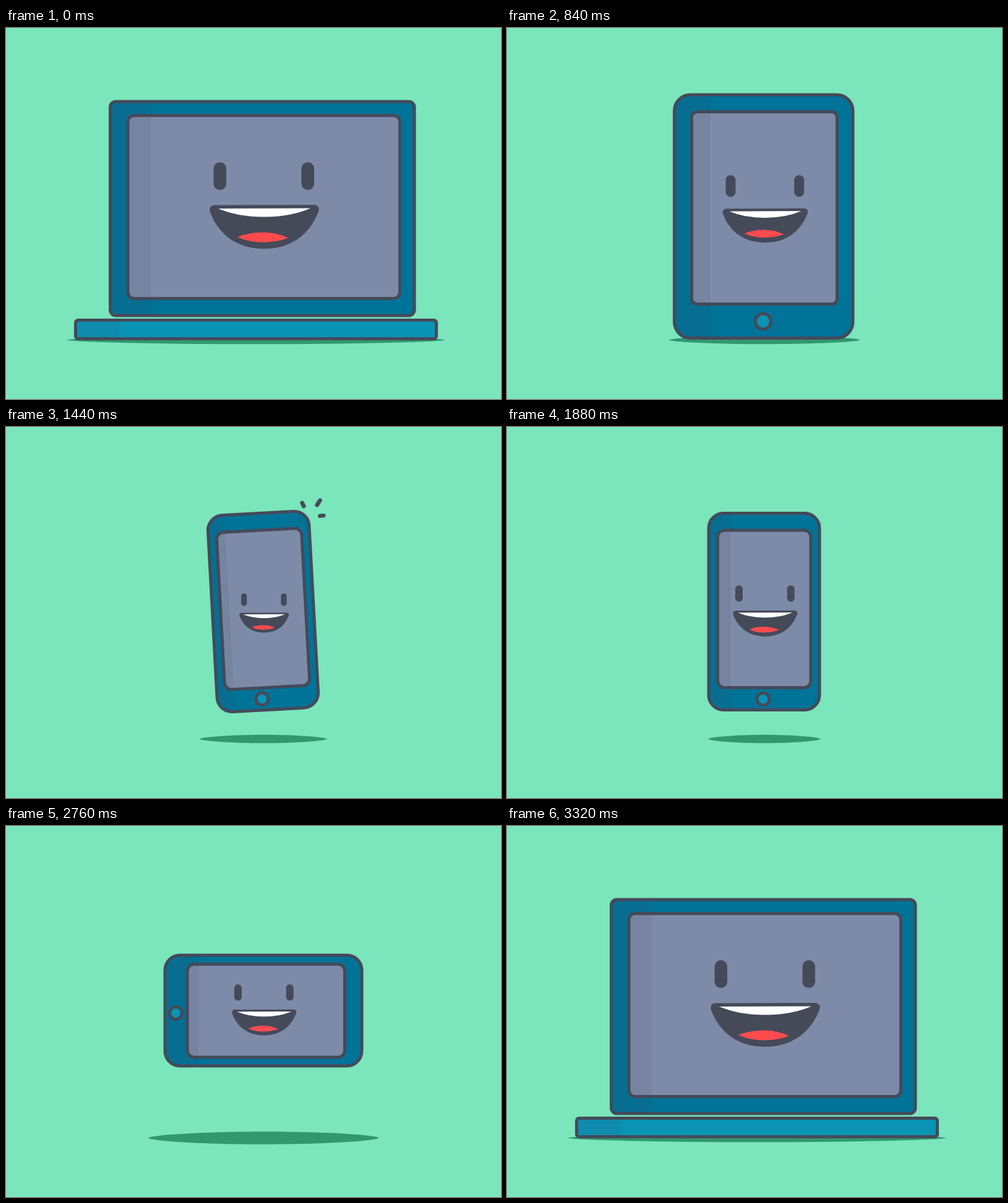
Write an HTML page that moves like this. It is 800 px wide and 600 px high and loops after 3.36 s.

```html
<!DOCTYPE html>
<html lang="en">
<head>
<meta charset="utf-8">
<title>Shape-shifting device</title>
<style>
  html, body { margin: 0; width: 100%; height: 100%; overflow: hidden; background: #7be5bc; }
  svg { display: block; width: 100vw; height: 100vh; }
  .line { stroke: #454a59; stroke-width: 5; stroke-linejoin: round; }
  .ink { fill: #454a59; }
  .tint { fill: #454a59; opacity: .1; }
</style>
</head>
<body>
<svg viewBox="0 0 800 600">
  <defs>
    <clipPath id="lidClip"><path id="lidMask"/></clipPath>
    <clipPath id="keyClip"><path id="keyMask"/></clipPath>
  </defs>
  <path id="shadow" fill="#32976f"/>
  <g id="body">
    <g id="device">
      <g id="shell">
        <path id="lid" class="line" fill="#007398"/>
        <path id="screen" class="line" fill="#7d8ba9"/>
      </g>
      <g clip-path="url(#lidClip)"><rect id="shine" class="tint" x="-100" y="-100" height="800"/></g>
    </g>
    <g id="face">
      <rect class="ink" x="335.5" y="217" width="20.5" height="45" rx="10.25"/>
      <rect class="ink" x="477.5" y="217" width="20.5" height="45" rx="10.25"/>
      <path class="ink" d="M336 286.5L499 286Q508 288 505 297C490 335 460 357 417 357C374 357 344 335 330 298Q327 288 336 286.5Z"/>
      <path fill="#fff" d="M343 292L492 291.5Q460 305.5 417 305.5Q375 305.5 343 292Z"/>
      <path fill="#ff4b4e" d="M374 338Q392 330.5 415 330.5Q437 330.5 456 339.5Q437 346.5 415 346.5Q392 346.5 374 338Z"/>
    </g>
  </g>
  <g id="keyGroup">
    <path id="key" class="line" fill="#0994b6"/>
    <g clip-path="url(#keyClip)"><rect id="keyShine" class="tint" y="-100" height="800"/></g>
  </g>
  <path id="marks" fill="none" stroke="#454a59" stroke-linecap="round"/>
</svg>
<script>
const LOOP = 3360, STEP = 40;
const { PI, sin, cos, sqrt, min, max } = Math;
const el = Object.fromEntries([...document.querySelectorAll('[id]')].map(node => [node.id, node]));
const set = (id, attrs) => { for (const name in attrs) el[id].setAttribute(name, attrs[name]); };

// Boxes: centre x, centre y, width, height, corner radius. Shadow: centre x, half width, half height
const laptop = {
  lid: [414.25, 292, 491.5, 346, 9],
  screen: [416.75, 289.5, 439.5, 296, 10],
  key: [404, 487.5, 583, 30, 4],
  face: [1], shine: [234], shadow: [404, 305, 6.8]
};
const tablet = {
  lid: [414.75, 304.75, 288.5, 393.5, 26],
  screen: [416, 291, 235, 311, 9],
  key: [414, 474.5, 25, 25, 12.5],
  face: [.78], shine: [328], shadow: [416, 154, 6.8]
};
const phone = {
  lid: [415.5, 298.5, 179, 318, 24],
  screen: [415.75, 294.25, 150.5, 254.5, 11],
  key: [414, 440, 20, 20, 10],
  face: [.59], shine: [361.5], shadow: [416, 90.5, 6.8]
};

// The landscape pose is the phone after a quarter turn
const shellPivot = [415.75, 298.75], keyPivot = [413, 301.5];
const quarterTurn = ([x, y, w, h, r], [px, py]) => [px + py - y, py + x - px, h, w, r];
const wide = {
  lid: quarterTurn(phone.lid, shellPivot),
  screen: quarterTurn(phone.screen, shellPivot),
  key: quarterTurn(phone.key, keyPivot),
  face: phone.face, shine: [311], shadow: [416, 186, 10.3]
};

const stages = [
  { from: laptop, to: tablet, start: 240, peak: 400, end: 600, kick: .05, sway: 1 },
  { from: tablet, to: phone, start: 1160, peak: 280, end: 720, kick: 0 },
  { from: phone, to: wide, start: 2000, peak: 200, end: 640, kick: .1, spin: true },
  { from: wide, to: laptop, start: 2880, peak: 200, end: 440, kick: .2 }
];

// Rises past 1 by `kick`, then swings back to rest at `end`
function spring(u, peak, end, kick) {
  if (u <= 0) return 0;
  if (u < peak) {
    const k = u / peak;
    return (1 + kick) * k * k * (3 - 2 * k);
  }
  const v = min(1, (u - peak) / (end - peak));
  return 1 + kick * cos(1.5 * PI * v) * (1 - v) ** 2;
}

// Rounded box; a bulge bows the edges outwards and pulls the corners in
function box([cx, cy, w, height, radius], bulge) {
  const h = height - 2 * bulge;
  const r = max(2, min(radius - 2 * bulge, w / 2, h / 2));
  const l = cx - w / 2, R = cx + w / 2, t = cy - h / 2, b = cy + h / 2;
  const by = 2 * bulge, bx = by * min(1, h / w);
  const corner = (x, y) => `A${r} ${r} 0 0 1 ${x} ${y}`;
  return `M${l + r} ${t}Q${cx} ${t - by} ${R - r} ${t}${corner(R, t + r)}` +
    `Q${R + bx} ${cy} ${R} ${b - r}${corner(R - r, b)}` +
    `Q${cx} ${b + by} ${l + r} ${b}${corner(l, b - r)}` +
    `Q${l - bx} ${cy} ${l} ${t + r}${corner(l + r, t)}Z`;
}

function lens([cx, w, h]) {
  const cy = 504.5, l = cx - w, r = cx + w, k = .56 * w, v = .4 * h;
  return `M${l} ${cy}C${l} ${cy - v} ${cx - k} ${cy - h} ${cx} ${cy - h}` +
    `S${r} ${cy - v} ${r} ${cy}S${cx + k} ${cy + h} ${cx} ${cy + h}S${l} ${cy + v} ${l} ${cy}Z`;
}

// Ring marks radiate from the phone's top right corner
function rays(push) {
  return [[-116, 23, 6], [-57.5, 28, 9], [-7, 20.4, 6]].map(([deg, dist, len]) => {
    const a = deg * PI / 180;
    const at = d => `${490 + d * cos(a)} ${146 + d * sin(a)}`;
    return `M${at(dist + push - len / 2)}L${at(dist + push + len / 2)}`;
  }).join('');
}

function draw(t) {
  const stage = stages.findLast(s => s.start <= t) || stages[0];
  const { from, to, peak, end, spin } = stage;
  const u = min(max(0, t - stage.start), end);
  const progress = (rate, kick = stage.kick) => spring(u, peak / rate, end, kick);
  const part = (name, p) => from[name].map((a, i) => a + (to[name][i] - a) * p);

  const main = progress(1);
  const sway = stage.sway ? sin(PI * u / end) : 0;
  const lean = stage.sway ? -2.1 * sin(3 * PI * u / end) : 0;
  const turn = spin ? 90 * main : 0;

  const ringTime = min(1, max(0, (t - 1320) / 520));
  const ring = sin(PI * sqrt(ringTime));
  const tilt = -4.4 * ring * cos(2 * PI * (t - 1460) / 160);

  const lid = part('lid', spin ? 0 : main);
  const screen = part('screen', spin ? 0 : main);
  const key = part('key', spin ? 0 : progress(.875, .05));
  for (const shape of [lid, screen]) shape[2] *= 1 - .086 * ring;

  const lidPath = box(lid, 6 * sway), keyPath = box(key, 9 * sway);
  const face = part('face', progress(1.25, .18))[0] * (1 - .2 * ring);
  const shellTurn = `rotate(${turn} ${shellPivot})`;

  set('lid', { d: lidPath });
  set('lidMask', { d: lidPath, transform: shellTurn });
  set('screen', { d: box(screen, 2 * sway) });
  set('shell', { transform: shellTurn });
  set('shine', { width: part('shine', main)[0] + 100 });
  set('device', { transform: `rotate(${tilt} 415.5 298.5)` });
  set('body', { transform: `rotate(${lean} 416 303)` });
  set('face', { transform: `translate(416.9 312.2) scale(${face}) translate(-416.9 -312.2)` });

  set('key', { d: keyPath });
  set('keyMask', { d: keyPath });
  set('keyShine', { x: key[0] - key[2] / 2, width: max(0, (key[2] - 25) / 7.9) });
  set('keyGroup', { transform: `rotate(${turn} ${keyPivot})` });
  set('shadow', { d: lens(part('shadow', progress(.72))) });
  set('marks', {
    d: rays(52 * max(0, ringTime - .25)),
    'stroke-width': 6.5 * ring,
    visibility: ring > .01 ? 'visible' : 'hidden'
  });
}

const start = performance.now();
function tick() {
  const t = (performance.now() - start) % LOOP;
  draw(Math.floor(t / STEP) * STEP);
  requestAnimationFrame(tick);
}
tick();
</script>
</body>
</html>
```
